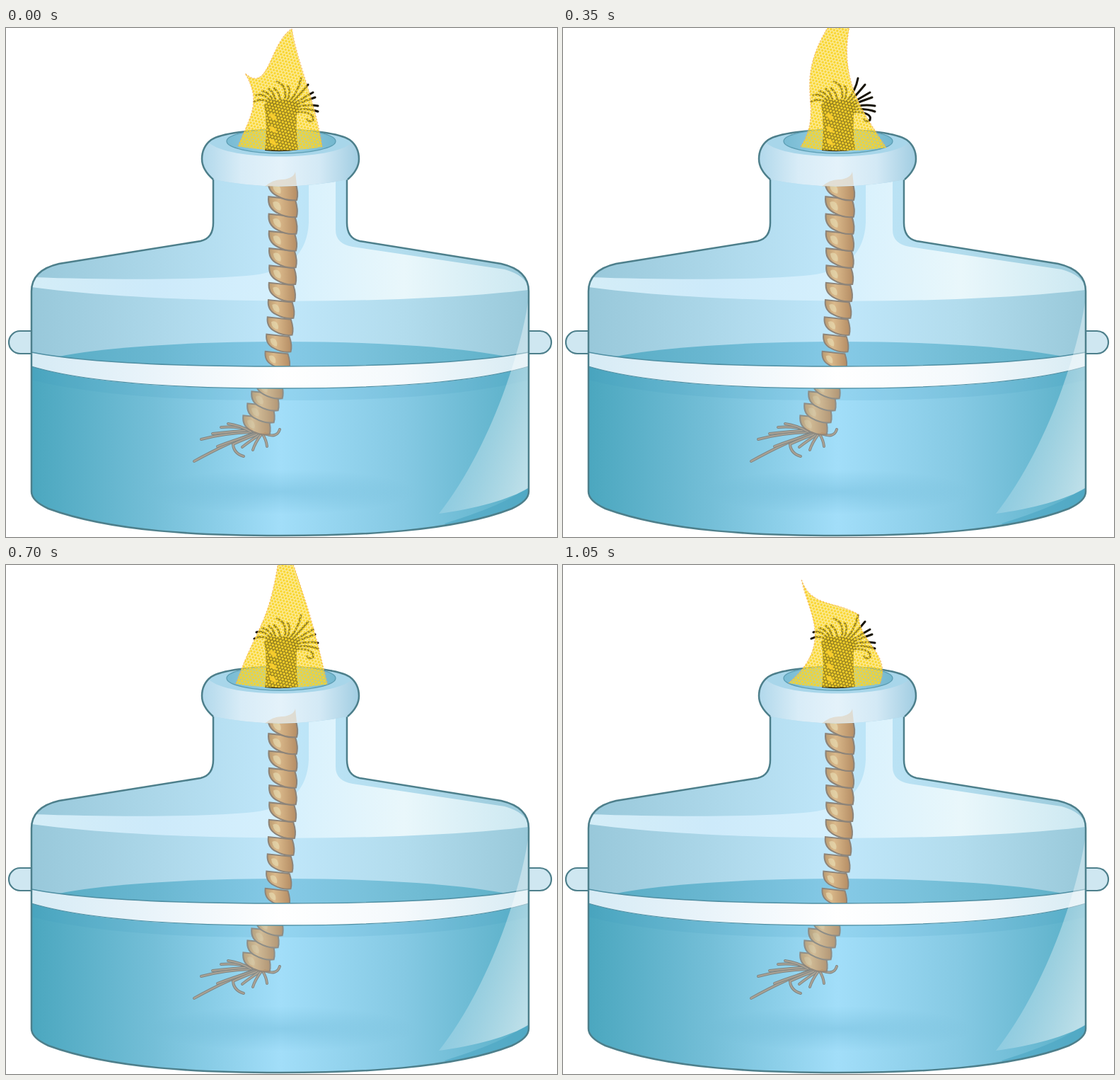
These frames come from a looping animation (779x719 px, 1.12 s). An HTML page:

```html
<!DOCTYPE html>
<html lang="en">
<head>
<meta charset="utf-8">
<title>Spirit burner</title>
<style>
html, body { margin: 0; width: 100%; height: 100%; overflow: hidden; background: #fff; }
svg { display: block; }
</style>
</head>
<body>
<svg width="779" height="719" viewBox="0 0 779 719" fill="none">
  <defs id="defs">
    <pattern id="dots" width="4.6" height="8" patternUnits="userSpaceOnUse" patternTransform="rotate(14)">
      <g fill="#f9d42a">
        <circle cx="2.3" cy="2" r="1.85"/>
        <circle cx="0" cy="6" r="1.85"/>
        <circle cx="4.6" cy="6" r="1.85"/>
      </g>
    </pattern>
    <linearGradient id="glint" x1="625" y1="590" x2="745" y2="620" gradientUnits="userSpaceOnUse">
      <stop stop-color="#fff" stop-opacity=".12"/>
      <stop offset="1" stop-color="#fff" stop-opacity=".62"/>
    </linearGradient>
    <radialGradient id="shade">
      <stop stop-color="#4fa3c4" stop-opacity=".28"/>
      <stop offset="1" stop-color="#4fa3c4" stop-opacity="0"/>
    </radialGradient>
    <path id="glass" d="M293 214V275Q293 297 275 301L75 333Q36 342 36 372V655Q36 668 60 679C150 712 280 717 388 717S630 712 715 679Q739 668 739 655V372Q739 342 700 333L500 301Q482 297 482 275V214"/>
    <clipPath id="inside"><use href="#glass"/></clipPath>
  </defs>

  <!-- side lugs and glass body -->
  <path d="M40 428H20A16 16 0 0 0 20 460H40M735 428H755A16 16 0 0 1 755 460H735" fill="#cfe7f1" stroke="#4d7f8b" stroke-width="2.2"/>
  <use href="#glass" fill="url(#body)"/>
  <g clip-path="url(#inside)">
    <path d="M36 352C150 356 280 356 350 349Q425 340 428 275V210H466V285Q466 305 490 309L705 341Q737 350 739 370C560 391 230 392 36 366Z" fill="url(#shoulder)"/>
    <path d="M36 474C150 433 620 433 739 472V520H36Z" fill="url(#surface)"/>
    <path d="M36 476C130 506 290 509 388 509S645 506 739 476V719H36Z" fill="url(#liquid)"/>
    <path d="M36 478C130 506 290 509 388 509S645 506 739 478V497C640 523 500 526 388 526S140 523 36 497Z" fill="#3c91b5" opacity=".13"/>
    <ellipse cx="390" cy="655" rx="190" ry="32" fill="url(#shade)"/>
    <path d="M620 700C670 684 715 668 739 646V690L640 715Z" fill="#4ba6c4" opacity=".6"/>
  </g>

  <g id="fray" stroke-linecap="round"></g>
  <g id="rope"></g>

  <path d="M36 458C130 476 290 478 388 478S645 476 739 458V478C645 506 500 509 388 509S130 506 36 478Z" fill="url(#ring)"/>
  <path d="M36 458C130 476 290 478 388 478S645 476 739 458M36 478C130 506 290 509 388 509S645 506 739 478" stroke="#4f8fa3" stroke-width="1.3"/>
  <path d="M738 388C725 470 680 600 612 686C660 680 715 665 738 650Z" fill="url(#glint)"/>
  <use href="#glass" stroke="#4d7f8b" stroke-width="2.5"/>

  <!-- lip -->
  <path d="M293 214Q277 200 277 185Q277 168 290 158C320 139 456 139 486 158Q499 168 499 185Q499 200 483 214Q388 233 293 214Z" fill="#a8d6ea"/>
  <path d="M280 172Q282 166 287 162C315 188 461 188 489 162Q499 172 499 187Q499 200 483 214Q388 233 293 214Q277 200 277 187Z" fill="url(#lip)"/>
  <path d="M366 224Q378 213 392 214Q407 212 409 203L411 222Z" fill="#dfae7c" opacity=".3"/>
  <path d="M293 214Q277 200 277 185Q277 168 290 158C320 139 456 139 486 158Q499 168 499 185Q499 200 483 214" stroke="#4d7f8b" stroke-width="2.5"/>
  <ellipse cx="389" cy="160" rx="77" ry="17" fill="url(#mouth)" stroke="#5b9db3" stroke-width="1.3"/>

  <g id="wick" stroke-linecap="round"></g>
  <path id="fire" fill="#f8d83c" fill-opacity=".42"/>
  <path id="grain" fill="url(#dots)"/>
  <path id="edge" stroke="#f3a65c" stroke-width="1.4" stroke-dasharray="2 2.4" opacity=".65"/>
  <path id="spark" d="M407 -2Q409 8 418 18Q414 6 411 -2Z" fill="#f9d42a"/>
  <path id="soot" d="M394 97Q408 90 426 96L441 110Q418 116 404 109Z" fill="#0c0a05"/>
</svg>
<script>
const $ = id => document.getElementById(id);

// Horizontal gradients with evenly spaced colours.
function gradient(id, x1, x2, colours) {
  const stops = colours.split(' ').map((c, i, all) =>
    `<stop offset="${i / (all.length - 1)}" stop-color="#${c}"/>`).join('');
  $('defs').innerHTML += `<linearGradient id="${id}" gradientUnits="userSpaceOnUse" x1="${x1}" y1="0" x2="${x2}" y2="0">${stops}</linearGradient>`;
}
gradient('body', 36, 739, '98c8da acd7e9 c0e7fa b2dced 99c9da');
gradient('shoulder', 36, 739, 'd4edf7 cdeafa d5f0fd e9f7fb cce8f1');
gradient('surface', 36, 739, '55abc3 6ab7d1 86cae7 73bdd5 5bafc7');
gradient('liquid', 36, 739, '4ba7bf 75bfd8 a2def9 85c9e3 59afc7');
gradient('ring', 36, 739, 'd6ebf5 eaf4fa ffffff f4f9fc d7ebf3');
gradient('lip', 277, 499, 'b1d8eb d8ecf7 e4f2fa d3e9f5 a1cde2');
gradient('mouth', 312, 466, '78bbd3 9bd1e7 73b7ce');
$('defs').innerHTML += `<linearGradient id="strand"><stop stop-color="#b99a70"/><stop offset=".35" stop-color="#dab98b"/><stop offset="1" stop-color="#b58d64"/></linearGradient>`;

const line = (d, colour, width) => `<path d="${d}" stroke="${colour}" stroke-width="${width}"/>`;

// One twist of the rope, hanging over the one below it.
const twist = (x, y, scale, alpha) => `<g transform="translate(${x} ${y}) scale(${scale})">
  <path d="M-20 -18Q-22 -2 -8 5Q6 13 20 11Q23 1 18 -14Z" fill="url(#strand)" stroke="#8d8479" stroke-width="2.2"/>
  <path d="M-14 -10Q-9 -13 -5 -9Q-1 -4 -3 2Q-13 1 -14 -10Z" fill="#e9dfb5" opacity="${alpha}"/></g>`;
let rope = '';
for (let i = 3; i >= 0; i--) rope += twist(354 + i * 0 + (3 - i) * 6, 564 - (3 - i) * 17, .93, .3);
rope = `<g opacity=".88">${rope}</g>`;
for (let i = 10; i >= 0; i--) {
  const y = 232 + i * 24;
  rope += twist(391 - Math.max(0, y - 340) ** 1.5 / 200, y, 1 - i * .016, .6);
}
$('rope').innerHTML = rope;

const tails = ['M352 572Q315 585 266 612', 'M347 571Q310 572 276 581', 'M346 568Q318 570 292 573',
  'M347 568Q325 562 304 564', 'M346 570Q330 561 314 559', 'M353 573Q320 583 299 591',
  'M355 574Q333 582 321 588Q322 601 336 605', 'M358 575Q344 584 334 592',
  'M361 574Q352 586 349 596', 'M363 574Q368 582 369 591', 'M366 573Q383 580 387 567'];
$('fray').innerHTML = tails.map(d => line(d, '#7f8583', 4) + line(d, '#aaa294', 2.2)).join('');

const hairs = ['M378 112Q368 96 351 104', 'M380 110Q366 91 354 95', 'M381 108Q371 89 362 89',
  'M384 108Q377 88 371 86', 'M388 106Q387 91 379 85', 'M393 104Q400 82 383 76',
  'M396 106Q404 90 398 82', 'M401 104Q414 88 417 71', 'M404 106Q418 91 427 80',
  'M405 108Q420 99 434 91', 'M406 110Q422 103 437 98', 'M406 113Q424 107 441 110',
  'M407 115Q428 113 441 118', 'M408 118Q438 119 434 130Q429 134 426 129'];
$('wick').innerHTML = '<path d="M366 173Q370 139 365 108Q388 94 412 108Q409 143 413 172Q390 176 366 173Z" fill="#30270a"/>'
  + hairs.map(d => line(d, '#171306', 3)).join('')
  + [121, 139, 157].map(y => `<path d="M372 ${y}Q380 ${y - 2} 383 ${y + 9}Q374 ${y + 9} 372 ${y}Z" fill="#e9ab25"/>`).join('');

// Outline: base, two controls, left peak, two controls, right peak, two controls, base.
const poses = [
  [0, '328 167 345 125 362 105 338 64 372 94 372 22 404 1 412 50 438 105 447 168'],
  [2, '326 167 352 60 402 70 394 -4 398 -4 403 -4 407 -4 445 60 405 85 443 168'],
  [5, '336 168 372 110 322 85 375 -2 385 -2 395 -2 405 -2 390 75 425 120 457 169'],
  [9, '322 168 375 110 340 65 394 -1 396 -2 397 -2 399 -1 450 60 420 70 453 169'],
  [11, '328 168 335 60 400 110 375 -2 387 -2 400 -2 413 -2 418 105 445 85 456 168'],
  [13, '327 167 328 115 368 85 351 40 372 88 405 80 440 58 434 95 440 130 445 168'],
  [15, '319 167 385 110 345 65 337 20 350 60 385 50 418 70 418 110 465 125 448 168']
].map(([step, text]) => [step, text.split(' ').map(Number)]);
poses.push([16, poses[0][1]]);

function outline(step) {
  const next = poses.findIndex(p => p[0] > step);
  const [s0, a] = poses[next - 1], [s1, b] = poses[next];
  const k = (step - s0) / (s1 - s0);
  const p = a.map((v, i) => v + (b[i] - v) * k);
  return `M${p.slice(0, 2)}C${p.slice(2)}`;
}

const show = (id, on) => $(id).setAttribute('visibility', on ? 'visible' : 'hidden');

function draw() {
  const step = Math.floor(performance.now() % 1120 / 70);
  const side = outline(step);
  const start = side.slice(1, side.indexOf('C'));
  for (const id of ['fire', 'grain']) $(id).setAttribute('d', `${side}Q388 178 ${start}Z`);
  $('edge').setAttribute('d', side);
  show('spark', step === 13);
  show('soot', step === 11);
  requestAnimationFrame(draw);
}
draw();
</script>
</body>
</html>
```
